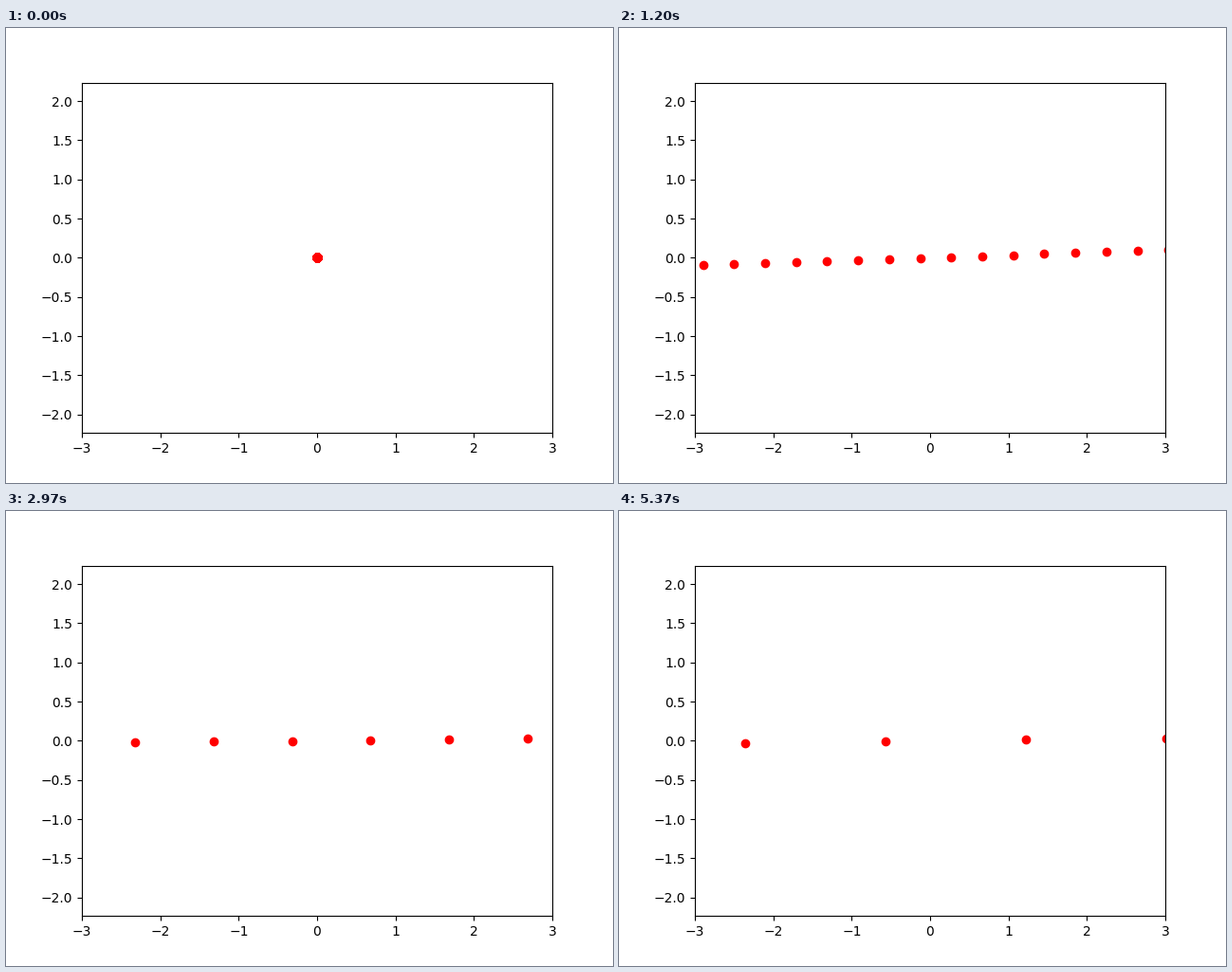
Write a matplotlib script that moves like this. It is 640 px wide and 480 px high and loops after 5400 ms.

```python
import numpy as np
import matplotlib.pyplot as plt
from matplotlib.animation import FuncAnimation

FRAMES = 180
INTERVAL = 30  # ms

r = np.arange(-2 * np.pi, 2 * np.pi, 0.01)

fig, ax = plt.subplots(figsize=(6.4, 4.8), dpi=100)

# Same scale on both axes
box = ax.get_position()
half_h = 3 * (box.height * 4.8) / (box.width * 6.4)
ax.set_xlim(-3, 3)
ax.set_ylim(-half_h, half_h)

dots, = ax.plot([], [], 'ro')


def update(t):
    """Scale every radius along the cubed cycloid at angle t."""
    dots.set_data(r * (t - np.sin(t) ** 3), r * (1 - np.cos(t) ** 3))
    return dots,


def init():
    return update(0)


anim = FuncAnimation(fig, update, frames=FRAMES, init_func=init,
                     interval=INTERVAL, repeat=True, repeat_delay=0)

plt.show()
```
